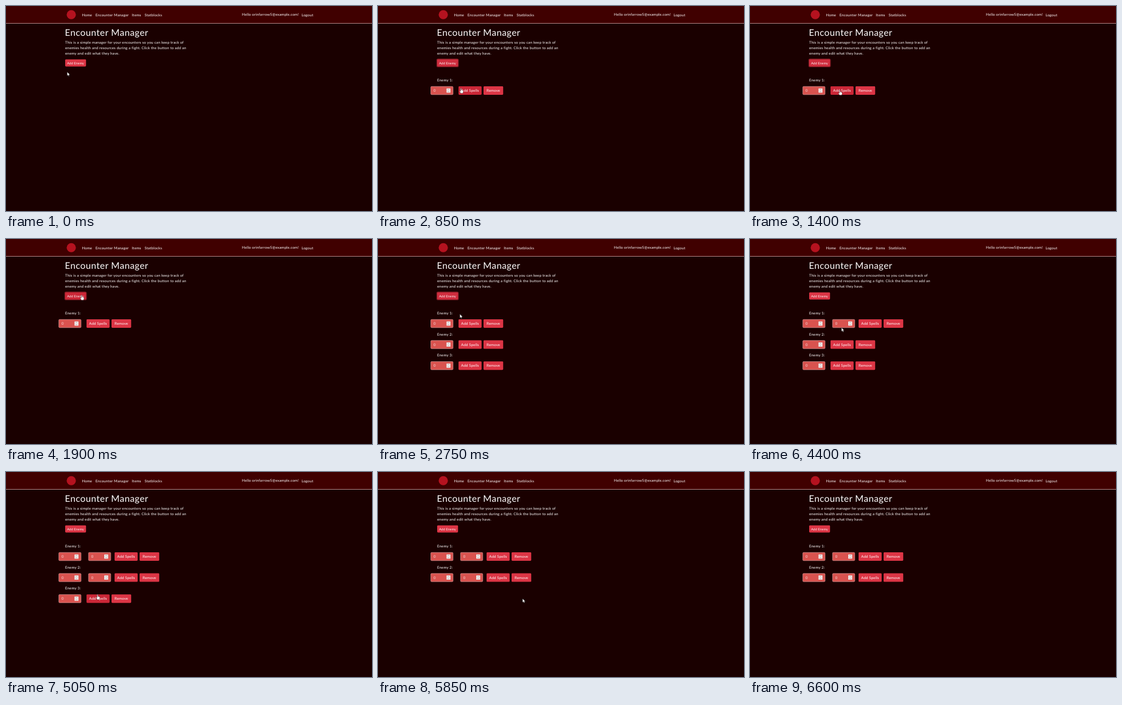
Write an HTML page that moves like this. It is 600x337 px and loops after 7 s.

```html
<!DOCTYPE html>
<html lang="en">
<head>
<meta charset="utf-8">
<title>Encounter Manager</title>
<style>
html, body { margin: 0; width: 100%; height: 100%; overflow: hidden; background: #1a0000; }
svg { display: block; width: 100vw; height: 100vh; }
text {
  font: 6px Lato, "Open Sans", sans-serif;
  letter-spacing: .03em;
  text-rendering: geometricPrecision;
  fill: #fff;
}
.title { font-size: 15px; }
.small { font-size: 5.25px; }
.mid { text-anchor: middle; }
.value { fill: #f6dcdc; }
</style>
</head>
<body>
<svg viewBox="0 0 600 337">
  <rect width="600" height="337" fill="#1a0000"/>
  <rect width="600" height="28" fill="#400000"/>
  <rect y="28" width="600" height="1" fill="#ab7f7f"/>
  <circle cx="107" cy="14.3" r="7.5" fill="#b5121f"/>
  <text x="124.5" y="16.8">Home</text>
  <text x="146.7" y="16.8">Encounter Manager</text>
  <text x="206.3" y="16.8">Items</text>
  <text x="227.2" y="16.8">Statblocks</text>
  <text x="386.8" y="16.3">Hello orinfarrow5@example.com!</text>
  <text x="484.5" y="16.8">Logout</text>
  <text class="title" x="96.6" y="49">Encounter Manager</text>
  <text x="97" y="62">This is a simple manager for your encounters so you can keep track of</text>
  <text x="97" y="71">enemies health and resources during a fight. Click the button to add an</text>
  <text x="97" y="80">enemy and edit what they have.</text>
  <g id="controls"></g>
  <g fill="#fff" stroke="#000" stroke-width=".35">
    <path id="arrow" d="M0 0V6.2L1.5 4.9 2.5 7.1 3.5 6.6 2.6 4.5H4.5Z"/>
    <path id="hand" d="M-.7 .5Q0 -.5 .7 .5V3.1L3 3.6 3.8 4.3V6.4L3.1 8.4H-.4L-2.2 5.5Q-2.5 4.4 -1.6 4.5L-.7 5.3Z"/>
  </g>
</svg>
<script>
const LOOP = 7000, STEP = 50, TRAVEL = 350;
const ADD_TIMES = [450, 2150, 2400];
const REMOVE_TIME = 5750, HIDE_TIME = 6600;
const SPELL_SHIFT = 46;

const rowMiddle = row => 139 + row * 34.6;
const spellTime = row => 4150 + row * 500;
const stop = (time, x, y) => ({ time, x, y });
const onSpells = (time, row) => stop(time, 150, rowMiddle(row));

// The pointer rests at each stop, then glides to reach the next one on time.
const STOPS = [
  stop(0, 100.3, 108.5),
  stop(400, 114, 93),
  stop(850, 136, 135),
  onSpells(1500, 0),
  stop(1900, 124, 92),
  stop(2750, 134.2, 123.5),
  onSpells(3200, 2),
  onSpells(3650, 1),
  onSpells(3850, 0),
  onSpells(spellTime(1), 1),
  onSpells(spellTime(2), 2),
  stop(5550, 237, rowMiddle(2)),
  stop(6300, 235, 264),
  stop(6550, 186, 323)
];

const controls = document.getElementById("controls");
const arrow = document.getElementById("arrow");
const hand = document.getElementById("hand");

function pointerAt(t) {
  const next = STOPS.findIndex(s => s.time > t);
  if (next < 0) return STOPS.at(-1);
  const from = STOPS[next - 1], to = STOPS[next];
  const depart = Math.max(from.time, to.time - TRAVEL);
  const u = Math.max(0, (t - depart) / (to.time - depart));
  const e = u * u * (3 - 2 * u);
  return { x: from.x + (to.x - from.x) * e, y: from.y + (to.y - from.y) * e };
}

function field(x, middle) {
  return `<g transform="translate(${x} ${middle})">
    <rect x=".25" y="-6.75" width="36.5" height="13.5" rx="1.4" fill="#d9534f" stroke="#e5b9b9" stroke-width=".5"/>
    <text class="value" x="4.7" y="2.1">0</text>
    <rect x="26" y="-3.5" width="6.5" height="7" rx=".4" fill="#f0e9e9"/>
    <path d="M28.1 -1l1.1 -1.2 1.1 1.2M28.1 1l1.1 1.2 1.1 -1.2" fill="none" stroke="#777" stroke-width=".5"/>
  </g>`;
}

function render(t) {
  const tip = pointerAt(t);
  let overButton = false;

  function button(label, x, middle, w, h, { small = false, focus = false } = {}) {
    const y = middle - h / 2;
    const hover = tip.x >= x && tip.x <= x + w && Math.abs(tip.y - middle) <= h / 2;
    overButton ||= hover;
    const fill = hover ? "#cb2737" : focus ? "#d02d3e" : "#dc3545";
    const ring = focus ? `stroke="#dc3545" stroke-opacity=".5" stroke-width="2.4" paint-order="stroke"` : "";
    return `<rect x="${x}" y="${y}" width="${w}" height="${h}" rx="1.4" fill="${fill}" ${ring}/>
      <text class="mid ${small ? "small" : ""}" x="${x + w / 2}" y="${middle + 2}">${label}</text>`;
  }

  const focus = t >= ADD_TIMES[0] && t < spellTime(0);
  let out = button("Add Enemy", 97, 93.6, 34.2, 11.6, { small: true, focus });

  ADD_TIMES.forEach((added, row) => {
    if (t < added || (row === 2 && t >= REMOVE_TIME)) return;
    const middle = rowMiddle(row), hasSpell = t >= spellTime(row);
    const shift = hasSpell ? SPELL_SHIFT : 0;
    out += `<text x="97" y="${middle - 15}">Enemy ${row + 1}:</text>` + field(86.3, middle);
    if (hasSpell) out += field(135, middle);
    out += button("Add Spells", 132 + shift, middle, 37.8, 14);
    out += button("Remove", 173 + shift, middle, 32.2, 14);
  });

  controls.innerHTML = out;
  for (const [shape, active] of [[arrow, !overButton], [hand, overButton]]) {
    shape.setAttribute("transform", `translate(${tip.x} ${tip.y})`);
    shape.setAttribute("visibility", active && t < HIDE_TIME ? "visible" : "hidden");
  }
}

const start = performance.now();
let last = -1;
function tick() {
  const elapsed = (performance.now() - start) % LOOP;
  const t = Math.floor(elapsed / STEP) * STEP;
  if (t !== last) render(last = t);
  requestAnimationFrame(tick);
}
tick();
</script>
</body>
</html>
```
